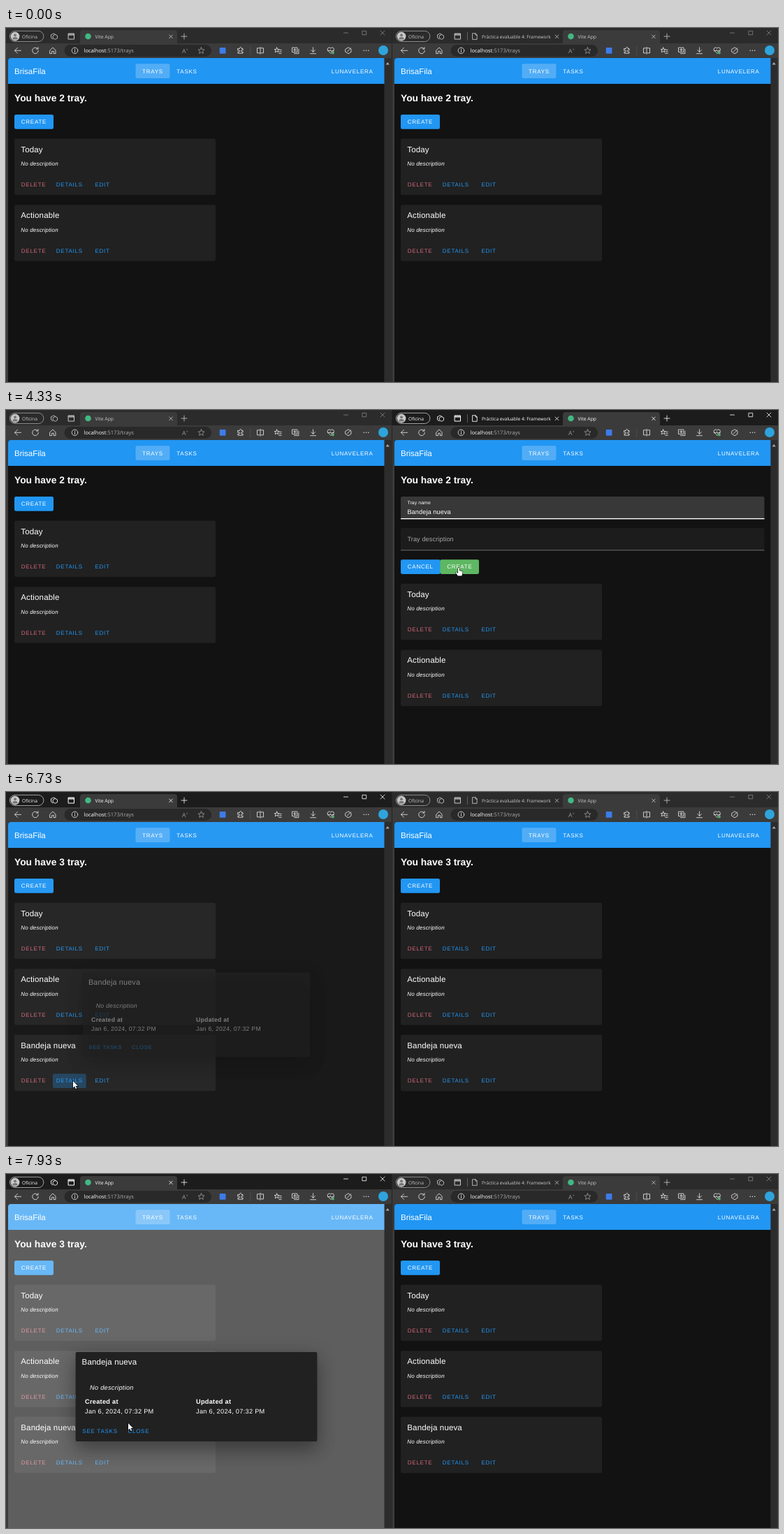
Write an HTML page with a canvas that moves like this. It is 1105x507 px and loops after 8 s.

```html
<!DOCTYPE html>
<html lang="es">
<head>
<meta charset="utf-8">
<title>Trays</title>
<style>
html, body { margin: 0; width: 100%; height: 100%; overflow: hidden; background: #121212; }
canvas { display: block; }
</style>
</head>
<body>
<canvas id="stage" width="1105" height="507"></canvas>
<script>
const ctx = document.getElementById('stage').getContext('2d');
const LOOP = 8000, RIGHT = 553;
const PAGE = "'Liberation Sans', Arial, sans-serif", UI = "'Open Sans', 'Noto Sans', sans-serif";
const BLUE = '#2196f3', GREEN = '#4caf50', RED = '#cf6679', SURFACE = '#212121', BAR = '#3b3b3b';

const ICONS = {
  back: 'M4.5 0H-4.5M-.5-4L-4.5 0L-.5 4',
  reload: 'M3.2-2.8A4.3 4.3 0 1 0 4.3 0M4-4.6V-2.2H1.4',
  home: 'M-4-.5L0-4.3L4-.5V4.3H1.3V1H-1.3V4.3H-4Z',
  info: 'M4.3 0A4.3 4.3 0 1 1-4.3 0A4.3 4.3 0 1 1 4.3 0M0-2.3V-1.6M0-.4V2.3',
  star: 'M0-4.5L1.3-1.5L4.5-1.3L2.1 .9L2.8 4.1L0 2.4L-2.8 4.1L-2.1 .9L-4.5-1.3L-1.3-1.5Z',
  puzzle: 'M-3.5-2.5H-1A1.4 1.4 0 1 1 1.5-2.5H3.5V0A1.4 1.4 0 1 0 3.5 2V4.2H-3.5V2A1.4 1.4 0 1 0-3.5 0Z',
  split: 'M-1-3.5H-4.5V3.5H-1M1-3.5H4.5V3.5H1M0-5V5',
  favs: 'M-1.5-4.3L-.5-1.8H2L0-.2L.5 2.5L-1.5 1L-4 2.5L-3.2-.2L-5-1.8H-2.5ZM2.5-1H5M2 1.5H5M1.5 4H5',
  collections: 'M-4.5-4.2H2.5V2.2H-4.5ZM4.5-2V4.3H-2M-1-3V1M-3-1H1',
  download: 'M0-4.5V2M-2.8-.8L0 2L2.8-.8M-4 4.4H4',
  heart: 'M0 4L-4.2-.3A2.4 2.4 0 0 1 0-3.2A2.4 2.4 0 0 1 4.2-.3ZM-4.5 .3H-1.5L-.5-1.2L.8 1.5L1.5 .3H4.5',
  edit: 'M-4-2L0-4.5L4-2V2L0 4.5L-4 2ZM-1.5 1.5L3.5-3.5',
  dots: 'M-3.2 0h.01M0 0h.01M3.2 0h.01',
  spaces: 'M-4.5-2L-1-4.2L2-2.5M-4.5-2V2L-2 3.8M-1.5-1L1.5-2.6L4.5-1V2.6L1.5 4.3L-1.5 2.6Z',
  tabs: 'M-4-4H4V4H-4ZM-4-3H4M-4-2H4',
  doc: 'M-3-4.3H1L3.2-2V4.3H-3ZM1-4.3V-2H3.2',
  close: 'M-2.3-2.3L2.3 2.3M2.3-2.3L-2.3 2.3',
  plus: 'M-4 0H4M0-4V4',
  min: 'M-3 0H3',
  max: 'M-2.7-2.7H2.7V2.7H-2.7Z',
  shut: 'M-3-3L3 3M3-3L-3 3'
};
const ARROW = new Path2D('M0 0V9.6L2.2 7.6L3.7 11L5.2 10.4L3.7 7.1H6.8Z');
const HAND = new Path2D('M-.9 .9C-.9-.4 .9-.4 .9 .9V4L4.6 5C5.6 5.4 5.6 6 5.4 7.5L4.4 11.6H-1.2L-3.9 7.6C-4.4 6.6-3.2 5.9-2.4 6.7L-.9 8Z');

// Pointer stops: time, x, y
const POINTER = [
  [70, 1100, 503], [200, 985, 430], [470, 760, 255], [700, 640, 165], [870, 595, 136],
  [3730, 595, 136], [3900, 606, 160], [4100, 636, 205], [4330, 648, 226],
  [5000, 648, 226], [5200, 448, 240], [5500, 215, 345], [5800, 96, 414],
  [7000, 96, 414], [7250, 128, 355], [7530, 167, 298], [7600, 167, 298], [7800, 179, 338], [7930, 175, 357]
];
// Typing bursts: first key, last key, characters
const BURSTS = [[2130, 2400, 4], [2600, 3200, 7], [3400, 3470, 2]];

const part = (t, from, span) => Math.min(1, Math.max(0, (t - from) / span));

// CSS cubic-bezier(x1, 0, .2, 1)
function ease(x, x1) {
  let lo = 0, hi = 1;
  for (let i = 0; i < 20; i++) {
    const m = (lo + hi) / 2, n = 1 - m;
    if (3 * n * n * m * x1 + .6 * n * m * m + m ** 3 < x) lo = m; else hi = m;
  }
  return 3 * lo * lo - 2 * lo ** 3;
}

function box(x, y, w, h, r, fill) {
  ctx.fillStyle = fill;
  ctx.beginPath();
  ctx.roundRect(x, y, w, h, r);
  ctx.fill();
}

function dot(x, y, r, fill) {
  ctx.fillStyle = fill;
  ctx.beginPath();
  ctx.arc(x, y, r, 0, 7);
  ctx.fill();
}

// y is the middle of the capitals
function text(str, x, y, size, { color = '#fff', style = '', gap = 0, font = PAGE } = {}) {
  ctx.font = `${style} ${size}px ${font}`;
  ctx.letterSpacing = gap + 'px';
  ctx.fillStyle = color;
  ctx.fillText(str, x, y + size * .358);
}
const label = (str, x, y, color) => text(str, x, y, 8.06, { color, gap: .72 });
const ui = (str, x, y, size, color) => text(str, x, y, size, { color, font: UI });

function icon(name, x, y, color = '#e4e4e4', width = .85) {
  ctx.save();
  ctx.translate(x, y);
  ctx.strokeStyle = color;
  ctx.lineWidth = width;
  ctx.lineCap = ctx.lineJoin = 'round';
  ctx.stroke(new Path2D(ICONS[name]));
  ctx.restore();
}

function button(str, x, y, w, color, hover) {
  box(x, y, w, 20.7, 2.3, color);
  if (hover) box(x, y, w, 20.7, 2.3, `rgba(255,255,255,${.1 * hover})`);
  label(str, x + 9.8, y + 10.4);
}

function tab(x, tone) {
  box(x, 3, 139, 19.5, [4, 4, 0, 0], BAR);
  dot(x + 11.5, 12, 4.3, '#41b883');
  ui('Vite App', x + 21.5, 12.2, 6.85, tone);
  icon('close', x + 130, 12.3, tone, .8);
  icon('plus', x + 149, 12, tone, .8);
}

function chrome(active, second) {
  const tone = active ? '#fff' : '#c9c9c9', dim = active ? '#fff' : '#858585';
  box(0, 0, 553, 22, 0, active ? '#1c1c1c' : '#2b2b2b');
  box(0, 22, 553, 485, 0, BAR);
  ctx.strokeStyle = active ? '#c4c4c4' : '#a4a4a4';
  ctx.lineWidth = .8;
  ctx.beginPath();
  ctx.roundRect(5.3, 4.3, 48.6, 15.2, 7.6);
  ctx.stroke();
  dot(13, 12, 6.4, '#c8c8c8');
  dot(13, 10.3, 2, '#777');
  box(9.5, 13, 7, 3.6, [3, 3, 1, 1], '#777');
  ui('Oficina', 23, 12.2, 6.7, tone);
  icon('spaces', 69, 12, tone);
  icon('tabs', 93.5, 12, tone, 1);
  if (second) {
    box(107, 6, .7, 12, 0, '#777');
    icon('doc', 118, 12, tone);
    ctx.save();
    ctx.beginPath();
    ctx.rect(127, 0, 100, 22);
    ctx.clip();
    ui('Práctica evaluable 4: Frameworks', 128, 12.2, 6.6, tone);
    ctx.restore();
    icon('close', 235.5, 12.3, tone, .8);
    tab(244, tone);
  } else tab(106, tone);
  icon('min', 486.5, 7, dim, .8);
  icon('max', 513, 7, dim, .8);
  icon('shut', 539, 7, dim, .8);

  box(83.5, 24, 210.5, 17, 8.5, '#292929');
  ['back', 'reload', 'home'].forEach((n, i) => icon(n, 17 + 25 * i, 32.3));
  icon('info', 98.5, 32.3);
  ui('localhost', 111.5, 32.5, 7.6, '#fff');
  ui(':5173/trays', 143.4, 32.5, 7.6, '#adadad');
  ui('A', 252, 32.7, 8.5, '#999');
  ui('»', 258, 30, 5, '#999');
  icon('star', 279.5, 32.3, '#999');
  box(305.7, 28, 8.8, 8.8, 1, '#3d7be8');
  icon('puzzle', 335.5, 32);
  box(349.5, 26, .7, 13, 0, '#555');
  ['split', 'favs', 'collections', 'download', 'heart', 'edit'].forEach((n, i) => icon(n, 364 + 25.2 * i, 32.3));
  dot(468, 35.5, 1.9, '#4fae6a');
  icon('dots', 515.5, 32.3, '#e4e4e4', 1.5);
  dot(540, 32, 7, '#2fa4dc');

  box(541.5, 43, 10, 464, 0, '#2c2c2c');
  ctx.fillStyle = '#a8a8a8';
  ctx.fill(new Path2D('M543.6 52.5L546.2 49L548.8 52.5Z'));
  box(552, 0, 1, 507, 0, '#242424');
}

function card(title, y) {
  box(12, y, 288, 80.5, 2.3, SURFACE);
  text(title, 21.3, y + 14.9, 11.51, { gap: .144 });
  text('No description', 21.3, y + 35.6, 8.06, { style: 'italic', gap: .144 });
  label('DELETE', 21.8, y + 65.8, RED);
  label('DETAILS', 71.8, y + 65.8, BLUE);
  label('EDIT', 127.4, y + 65.8, BLUE);
}

function page(count, top) {
  box(3, 43, 538.5, 464, [4, 0, 0, 0], '#121212');
  box(3, 43, 538.5, 37, [4, 0, 0, 0], BLUE);
  text('BrisaFila', 12, 61.8, 11.51);
  box(185.5, 51.3, 49, 20.7, 2.3, 'rgba(255,255,255,.22)');
  label('TRAYS', 195, 61.8);
  label('TASKS', 244.3, 61.8);
  label('LUNAVELERA', 465.8, 61.8);
  text(`You have ${count} tray.`, 12, 99.6, 13.81, { style: 'bold' });
  ['Today', 'Actionable', 'Bandeja nueva'].slice(0, count).forEach((n, i) => card(n, top + 94.6 * i));
}

function typed(t) {
  let n = 0;
  for (const [from, to, keys] of BURSTS)
    if (t >= from) n += Math.min(keys, 1 + Math.floor((t - from) / (to - from) * (keys - 1) + .01));
  return 'Bandeja nueva'.slice(0, n);
}

function form(t) {
  const float = ease(part(t, 1270, 150), .4), line = ease(part(t, 1270, 260), .4), grey = 165 + 90 * float;
  box(12, 124, 520.5, 32.2, [2.3, 2.3, 0, 0], `rgba(255,255,255,${.08 + .08 * float})`);
  box(12, 155.6, 520.5, .6, 0, '#888');
  box(272.2 - 260.2 * line, 155.1, 520.5 * line, 1.15, 0, '#fff');
  text('Tray name', 21.4, 140.2 - 7.2 * float, 9.2 - 2.3 * float, { color: `rgb(${grey},${grey},${grey})`, gap: .086 });
  const value = typed(t);
  text(value, 21.4, 145.8, 9.2, { gap: .086 });
  if (t >= 1400 && t < 1930 || t >= 2130 && t < 4000)
    box(21.5 + ctx.measureText(value).width, 141, .8, 10.3, 0, '#fff');

  const over = t > 3960 && t < 4080;
  box(12, 169, 520.5, 32.2, [2.3, 2.3, 0, 0], `rgba(255,255,255,${over ? .08 : .045})`);
  box(12, 200.6, 520.5, .7, 0, over ? '#ccc' : '#888');
  text('Tray description', 21.4, 184.9, 9.2, { color: '#a6a6a6', gap: .086 });
  button('CANCEL', 12, 214.2, 57, BLUE);
  button('CREATE', 68.4, 214.2, 55.6, GREEN, part(t, 4180, 150) + 1.5 * part(t, 4500, 100));
}

function dialog(p) {
  ctx.save();
  ctx.globalAlpha = p;
  ctx.translate(272.5, 319);
  ctx.scale(.9 + .1 * p, .9 + .1 * p);
  ctx.translate(-272.5, -319);
  for (const [dy, blur, a] of [[13.8, 24, .24], [5.2, 30, .2]]) {
    ctx.shadowColor = `rgba(0,0,0,${a})`;
    ctx.shadowOffsetY = dy;
    ctx.shadowBlur = blur;
    box(99.8, 254.9, 345.4, 128.2, 2.3, SURFACE);
  }
  ctx.shadowColor = 'transparent';
  const body = (str, x, y, style) => text(str, x, y, 9.2, { style, gap: .288 });
  text('Bandeja nueva', 108.6, 268.8, 11.51, { gap: .144 });
  body('No description', 120, 305.4, 'italic');
  ['Created at', 'Updated at'].forEach((head, i) => {
    body(head, 113 + 159 * i, 326.2, 'bold');
    body('Jan 6, 2024, 07:32 PM', 113 + 159 * i, 340.2);
  });
  label('SEE TASKS', 109.3, 368.2, BLUE);
  label('CLOSE', 174.4, 368.2, BLUE);
  ctx.restore();
}

function pressDetails(t) {
  const on = part(t, 5740, 150) * (1 - part(t, 6830, 120));
  if (!on) return;
  ctx.save();
  ctx.globalAlpha = on;
  ctx.beginPath();
  ctx.roundRect(67, 403.4, 47.8, 20.7, 2.3);
  ctx.clip();
  box(67, 403, 48, 22, 0, 'rgba(33,150,243,.1)');
  if (t > 6540) dot(91, 413.8, 28 * ease(part(t, 6540, 260), .4), 'rgba(33,150,243,.2)');
  ctx.restore();
}

function pointer(t) {
  if (t < POINTER[0][0]) return;
  let i = 0;
  while (i < POINTER.length - 2 && t >= POINTER[i + 1][0]) i++;
  const [t0, x0, y0] = POINTER[i], [t1, x1, y1] = POINTER[i + 1], k = part(t, t0, t1 - t0);
  ctx.save();
  ctx.translate(x0 + (x1 - x0) * k, y0 + (y1 - y0) * k);
  if (t >= 1000 && t < 3900) {
    ctx.strokeStyle = '#ddd';
    ctx.lineWidth = .8;
    ctx.stroke(new Path2D('M-1.8 0H1.8M0 0V10M-1.8 10H1.8'));
  } else {
    const hand = t > 820 && t < 1000 || t > 4180 && t < 5010;
    const shape = hand ? HAND : ARROW;
    ctx.strokeStyle = '#000';
    ctx.lineWidth = 1.1;
    ctx.stroke(shape);
    ctx.fillStyle = '#fff';
    ctx.fill(shape);
  }
  ctx.restore();
}

function draw(t) {
  const leftActive = t >= 6550, formOpen = t >= 1000 && t < 4600;
  ctx.textRendering = 'geometricPrecision';

  chrome(leftActive, false);
  page(t < 4670 ? 2 : 3, 158.6);
  button('CREATE', 12, 124, 56, BLUE);
  pressDetails(t);
  const scrim = .32 * ease(part(t, 6682, 300), .4);
  if (scrim) box(3, 43, 538.5, 464, [4, 0, 0, 0], `rgba(255,255,255,${scrim})`);
  const shown = ease(part(t, 6695, 225), 0);
  if (t > 6695) dialog(shown);

  ctx.save();
  ctx.translate(RIGHT, 0);
  chrome(t >= 930 && !leftActive, true);
  page(t < 4600 ? 2 : 3, formOpen ? 248.8 : 158.6);
  if (formOpen) form(t);
  else button('CREATE', 12, 124, 56, BLUE, t < 1000 ? part(t, 780, 120) : 0);
  if (t >= 4600 && t < 5030) box(67, 214, 47.8, 20.7, 2.3, 'rgba(33,150,243,.1)');
  ctx.restore();

  pointer(t);
}

const start = performance.now();
function tick() {
  draw((performance.now() - start) % LOOP);
  requestAnimationFrame(tick);
}
tick();
</script>
</body>
</html>
```
